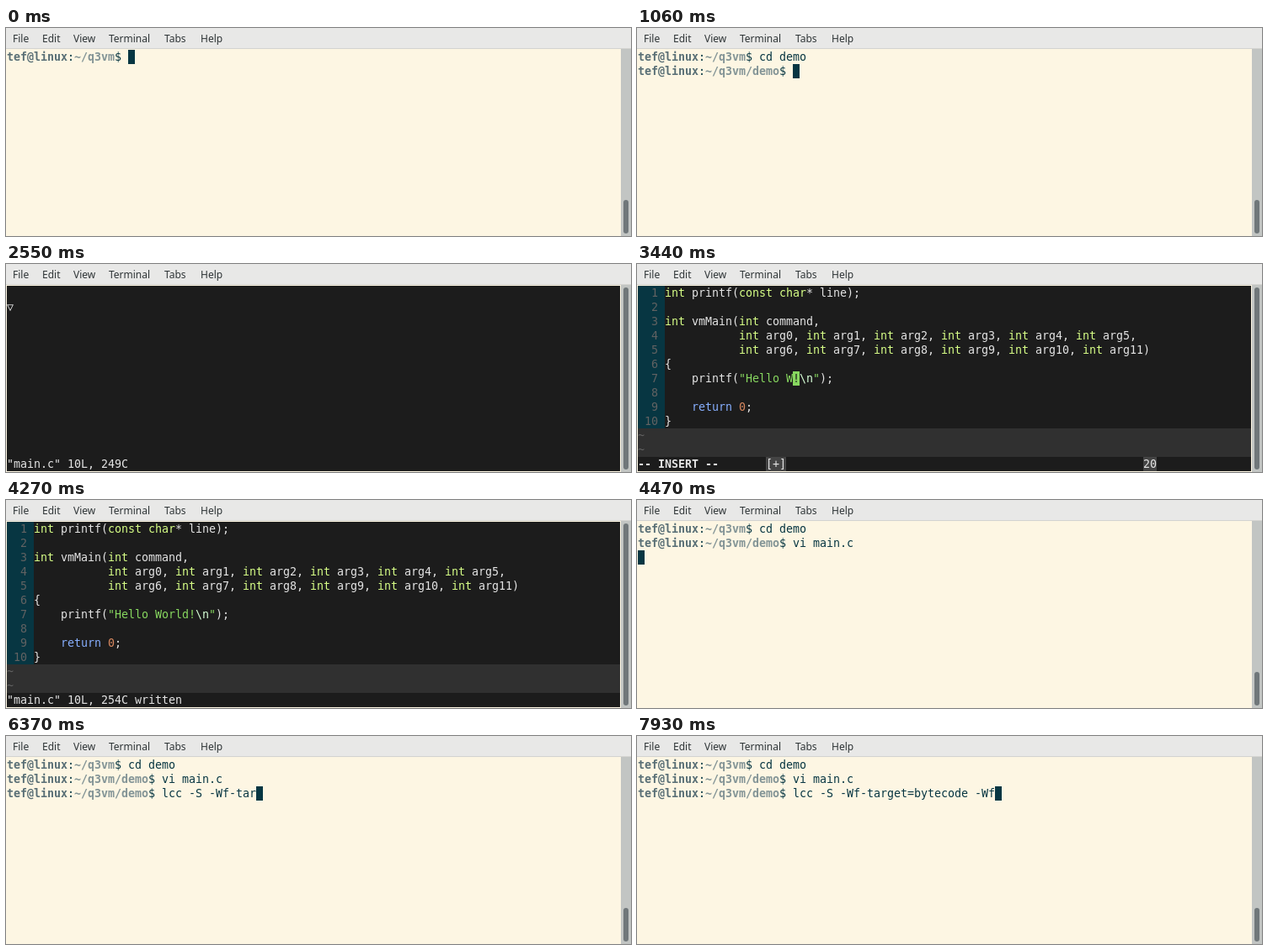
Recreate the animation shown at these times as an HTML page. Size 742 px wide and 248 px high, loop 7.99 s.

```html
<!DOCTYPE html>
<html lang="en">
<head>
<meta charset="utf-8">
<title>Terminal session</title>
<style>
  html, body { margin: 0; width: 100%; height: 100%; overflow: hidden; background: #fdf6e3; }
  svg { display: block; width: 742px; height: 248px; }
  .menu { font: 12px "Noto Sans", sans-serif; fill: #2e3436; }
  #screen { font: 13.333px "DejaVu Sans Mono", monospace; }
</style>
</head>
<body>
<svg viewBox="0 0 742 248" xmlns="http://www.w3.org/2000/svg">
  <rect width="742" height="248" fill="#fdf6e3"/>
  <rect width="742" height="24" fill="#e8e8e7"/>
  <rect y="24" width="742" height="1" fill="#d3d3d0"/>
  <g class="menu">
    <text x="8" y="17">File</text>
    <text x="43" y="17">Edit</text>
    <text x="80" y="17">View</text>
    <text x="122" y="17">Terminal</text>
    <text x="188" y="17">Tabs</text>
    <text x="231" y="17">Help</text>
  </g>
  <rect x="730" y="25" width="12" height="223" fill="#c2c5c3"/>
  <rect id="thumb" x="733" width="6" rx="3" fill="#70777a"/>
  <g id="screen"></g>
</svg>
<script>
const LOOP = 7990, CW = 8, CH = 17, LEFT = 1, TOP = 26, COLS = 91;
const INK = '#073642', HOST = '#586e75', PATH = '#839496';
const DARK = '#1c1c1c', FG = '#e4e4e4', DIM = '#626262', BAR = '#444444';
const TYPE = '#d7ff87', STRING = '#87d75f', ESCAPE = '#d7ffd7', STATEMENT = '#87afff', NUMBER = '#d7875f';

// Each span: first key time, last key time, keys at even intervals.
const CD = [[400, 810, 'cd demo']];
const VI = [[1670, 1770, 'vi '], [2030, 2390, 'main.c']];
const LCC = [
  [5080, 5080, 'l'], [5260, 5540, 'cc -S'], [5690, 5740, ' -'],
  [5910, 6370, 'Wf-tar'], [6490, 6570, 'get'], [6710, 6710, '='],
  [6940, 7630, 'bytecode -W'], [7930, 7930, 'f']
];
const WORD = [[3440, 3680, 'World']];
const QUIT = [[3990, 4140, ':wq']];

const CODE = word => [
  'int printf(const char* line);',
  '',
  'int vmMain(int command,',
  '           int arg0, int arg1, int arg2, int arg3, int arg4, int arg5,',
  '           int arg6, int arg7, int arg8, int arg9, int arg10, int arg11)',
  '{',
  `    printf("Hello ${word}!\\n");`,
  '',
  '    return 0;',
  '}'
];
const TOKENS = /("(?=\))|"[^"\\]*|\\n|\b(?:int|const|char|return|0)\b)/;

const screen = document.getElementById('screen');
const thumb = document.getElementById('thumb');

function typed(t, spans) {
  let out = '';
  for (const [from, to, keys] of spans) {
    const step = keys.length > 1 ? (to - from) / (keys.length - 1) : 0;
    [...keys].forEach((key, i) => { if (t >= from + i * step - 0.01) out += key; });
  }
  return out;
}

const escapeText = s => s.replace(/&/g, '&amp;').replace(/</g, '&lt;');

function fillCells(col, row, cols, rows, color) {
  return `<rect x="${LEFT + col * CW}" y="${TOP + row * CH}" width="${cols * CW}" height="${rows * CH}" fill="${color}"/>`;
}

// One text element per word, every glyph pinned to its cell.
function print(col, row, str, color, bold) {
  let out = '';
  for (const m of str.matchAll(/\S+/g)) {
    const xs = [...m[0]].map((c, i) => LEFT + (col + m.index + i) * CW).join(' ');
    out += `<text x="${xs}" y="${TOP + row * CH + 13}" fill="${color}"${bold ? ' font-weight="700"' : ''}>${escapeText(m[0])}</text>`;
  }
  return out;
}

function prompt(row, path, command, active) {
  const end = 10 + path.length;
  return print(0, row, 'tef@linux', HOST, true) + print(9, row, ':', INK) +
    print(10, row, path, PATH, true) + print(end, row, '$ ' + command, INK) +
    (active ? fillCells(end + 2 + command.length, row, 1, 1, INK) : '');
}

function shell(t) {
  let out = prompt(0, '~/q3vm', typed(t, CD), t < 1060);
  if (t >= 1060) out += prompt(1, '~/q3vm/demo', typed(t, VI), t < 2480);
  if (t >= 5080) out += prompt(2, '~/q3vm/demo', typed(t, LCC), true);
  else if (t >= 2480) out += fillCells(0, 2, 1, 1, INK);
  return out;
}

function tokenColor(s) {
  if (s[0] === '"') return STRING;
  if (s === '\\n') return ESCAPE;
  if (s === 'return') return STATEMENT;
  if (s === '0') return NUMBER;
  return /^(int|const|char)$/.test(s) ? TYPE : FG;
}

function codeLine(line, row) {
  let col = 4, out = print(0, row, String(row + 1).padStart(3), DIM);
  for (const part of line.split(TOKENS)) {
    out += print(col, row, part, tokenColor(part));
    col += part.length;
  }
  return out;
}

function statusLine(t, col, changed) {
  let out = '';
  if (t < 3290) out += print(0, 12, '"main.c" 10L, 249C', FG);
  else if (t < 3830) out += print(0, 12, '-- INSERT --', FG, true);
  if (changed) out += fillCells(19, 12, 3, 1, BAR) + print(19, 12, '[+]', FG);
  if (t >= 2750) out += fillCells(75, 12, 2, 1, BAR) + print(75, 12, String(col + 1), FG);
  return out;
}

function editor(t) {
  let out = fillCells(0, 0, COLS, 13, DARK);
  if (t < 2650) return out + print(0, 1, '▽', FG) + print(0, 12, '"main.c" 10L, 249C', FG);

  const word = typed(t, WORD), lines = CODE(word);
  out += fillCells(0, 0, 4, 10, INK) + fillCells(0, 10, COLS, 2, '#303030');
  out += lines.map(codeLine).join('') + print(0, 10, '~', DIM) + print(0, 11, '~', DIM);

  if (t >= 3990) {
    if (t >= 4370) return out;
    if (t >= 4260) return out + print(0, 12, '"main.c" 10L, 254C written', FG);
    const cmd = typed(t, QUIT);
    return out + print(0, 12, cmd, FG) + fillCells(cmd.length, 12, 1, 1, FG);
  }
  const col = 18 + word.length - (t < 3160 || t >= 3830 ? 1 : 0);
  if (t >= 2750) out += fillCells(col + 4, 6, 1, 1, STRING) + print(col + 4, 6, lines[6][col], DARK);
  return out + statusLine(t, col, word !== '');
}

let last = '';
function draw(t) {
  const inEditor = t >= 2550 && t < 4470;
  const markup = inEditor ? editor(t) : shell(t);
  if (markup === last) return;
  last = markup;
  screen.innerHTML = markup;
  thumb.setAttribute('y', inEditor ? 28 : 205);
  thumb.setAttribute('height', inEditor ? 217 : 40);
}

const start = performance.now();
function tick() {
  draw((performance.now() - start) % LOOP);
  requestAnimationFrame(tick);
}
tick();
</script>
</body>
</html>
```
